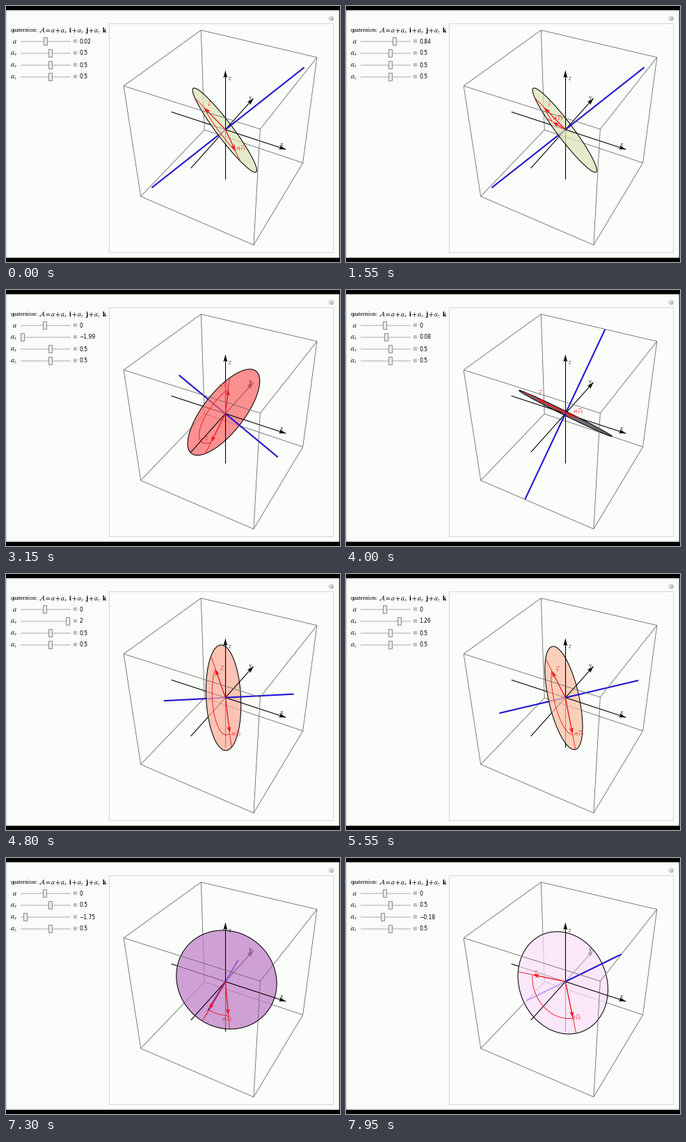
Animation of 480 by 368 pixels, one loop 8000 ms. Source, as a matplotlib script:

```python
import itertools
import numpy as np
import matplotlib.pyplot as plt
from matplotlib.animation import FuncAnimation
from matplotlib.patches import Circle, Polygon, Rectangle

W, H, DPI = 480, 368, 100
STEP, FRAMES = 50, 160
PX = 72 / DPI  # points per pixel

plt.rcParams["mathtext.fontset"] = "stix"

BLUE = (0.13, 0.08, 0.82)
RED = (0.93, 0.1, 0.13)
EDGE = (0.42, 0.42, 0.42)
RADIUS, ARROW = 0.79, 0.56
ALPHA = 0.72

# Turning points (ms, value) of each dragged slider
DRAG_A = [(-1013, -2), (1000, 2), (2000, 0)]
DRAG_X = [(2100, 0.5), (3200, -2), (4760, 2), (6350, 0.5)]
DRAG_Y = [(6250, 0.5), (6965, -2), (9055, 2)]

# Camera
EYE = np.array([1.3, -2.4, 2.0])
DIST = np.linalg.norm(EYE)
VIEW = EYE / DIST
RIGHT = np.cross([0, 0, 1], VIEW)
RIGHT /= np.linalg.norm(RIGHT)
UP = np.cross(VIEW, RIGHT)

# Colours added by light from the right, from above and from the viewer
AMBIENT = np.array([0.58, 0.71, 0.64])
LIGHTS = np.array([(0.37, 0.03, -0.05), (-0.03, 0.31, 0.25), (0.33, 0.04, 0.3)])
GLOSS = np.array([0.485, 0.23, 0.843])


def swing(t, turns):
    """Ease like a cosine from one turning point to the next."""
    value = turns[0][1]
    for (t0, v0), (t1, v1) in zip(turns, turns[1:]):
        if t > t0:
            u = min((t - t0) / (t1 - t0), 1)
            value = v0 + (v1 - v0) * (1 - np.cos(np.pi * u)) / 2
    return value


def project(p):
    p = np.asarray(p, float) / 2
    w = 1 - p @ VIEW / DIST
    return np.stack([315.3 + 186.5 * (p @ RIGHT) / w,
                     177.7 - 191 * (p @ UP) / w], axis=-1)


def unit(v):
    return v / np.linalg.norm(v)


def lit(n):
    """Colour of the disc whose visible side has normal n."""
    m = np.array([n @ RIGHT, n @ UP, n @ VIEW])
    shine = 0.08 * max(m @ GLOSS, 0) ** 12
    return np.clip(AMBIENT + m @ LIGHTS + shine, 0, 0.99)


fig = plt.figure(figsize=(W / DPI, H / DPI), dpi=DPI, facecolor="black")
ax = fig.add_axes([0, 0, 1, 1])
ax.set_xlim(0, W)
ax.set_ylim(H, 0)
ax.axis("off")


def rect(x, y, w, h, face, edge="none", lw=1, z=0):
    return ax.add_patch(Rectangle((x, y), w, h, fc=face, ec=edge,
                                  lw=lw * PX, zorder=z))


def line(points, color, lw, z):
    pts = np.asarray(points)
    return ax.plot(pts[:, 0], pts[:, 1], color=color, lw=lw * PX, zorder=z,
                   solid_capstyle="butt")[0]


def text(x, y, s, size, color="black", z=8, ha="left", font="Liberation Serif"):
    return ax.text(x, y, s, fontsize=size * PX, color=color, zorder=z, ha=ha,
                   va="center_baseline", family=font)


def head(color, z):
    return ax.add_patch(Polygon(np.zeros((4, 2)), fc=color, ec="none", zorder=z))


def head_shape(tail, tip, size=10, half=3):
    d = tip - tail
    length = np.hypot(*d)
    d = d / max(length, 1e-6)
    size = min(size, length)
    side = np.array([-d[1], d[0]]) * half
    base = tip - d * size
    return np.array([tip, base + side, base + d * size * 0.2, base - side])


def plus(x, y, r, color):
    line([(x - r, y), (x + r, y)], color, 0.8, 2)
    line([(x, y - r), (x, y + r)], color, 0.8, 2)


# Window and control panel
rect(-0.5, 5.5, 478, 355, (0.98, 0.99, 0.975), (0.8, 0.8, 0.8), 1.3)
rect(147.5, 24.5, 322.5, 329, (0.985, 0.993, 0.98), (0.83, 0.84, 0.83))
ax.add_patch(Circle((467.5, 18), 3, fc="0.93", ec="0.65", lw=0.8 * PX, zorder=1))
plus(467.5, 18, 1.8, "0.55")

text(7, 34, "quaternion:", 8.5)
text(47, 34, r"$\mathcal{A} = a + a_x\,\ \mathbf{i} + a_y\,\ \mathbf{j}"
             r" + a_z\,\ \mathbf{k}$", 9.6)

thumbs, values = [], []
for name, y in zip(("a", "a_x", "a_y", "a_z"), (50, 67, 84, 101)):
    text(12.5 if name == "a" else 11, y, f"${name}$", 10, ha="center")
    rect(20.5, y - 0.5, 71, 1.2, (0.88, 0.88, 0.88), (0.72, 0.72, 0.72), 0.5, 1)
    thumbs.append(rect(0, y - 5.5, 5, 11.5, (0.92, 0.92, 0.92),
                       (0.5, 0.5, 0.5), 0.9, 3))
    rect(96.5, y - 2, 4, 4, "0.9", "0.65", 0.8, 1)
    plus(98.5, y, 1.3, "0.6")
    values.append(text(105.5, y, "", 7.6, font="DejaVu Sans"))

# Box
far = (-1, 1, -1)
corners = list(itertools.product((-1, 1), repeat=3))
for p, q in itertools.combinations(corners, 2):
    if sum(i != j for i, j in zip(p, q)) == 1:
        line(project([p, q]), EDGE, 0.85, 1 if far in (p, q) else 6)

# Coordinate axes as half lines, so the disc can pass between them
halves = []
for d, (name, pos) in zip(np.eye(3), (("x", (396, 198)), ("y", (351.5, 131.5)),
                                      ("z", (322, 103.5)))):
    o, tip = project([(0, 0, 0), d])
    arrow = head("black", 2)
    arrow.set_xy(head_shape(o, tip))
    text(*pos, f"$\\mathbf{{\\mathit{{{name}}}}}$", 9.5, z=7, ha="center")
    halves.append((d, [line([o, tip], "black", 1.1, 2), arrow]))
    halves.append((-d, [line([o, project(-d)], "black", 1.1, 2)]))

disc = ax.add_patch(Polygon(np.zeros((3, 2)), fc="w", ec="none", zorder=3))
rim = line(np.zeros((2, 2)), "black", 1.05, 3.5)
rods = [line(np.zeros((2, 2)), BLUE, 2.1, 4) for _ in range(2)]
arc = line(np.zeros((2, 2)), RED, 0.9, 5)
spokes = [line(np.zeros((2, 2)), RED, 0.9, 5) for _ in range(2)]
shafts = [line(np.zeros((2, 2)), RED, 1.4, 5) for _ in range(2)]
heads = [head(RED, 5) for _ in range(2)]
tags = [text(0, 0, s, 9, RED, 7, "center")
        for s in (r"$\vec{v}$", r"$r(\vec{v})$")]


def place(artist, points):
    artist.set_data(points[:, 0], points[:, 1])


def show_sliders(numbers):
    for thumb, label, v in zip(thumbs, values, numbers):
        thumb.set_x(56 + 16.2 * v - 2.7)
        s = f"{v:.2f}".rstrip("0").rstrip(".")
        label.set_text("0" if s == "-0" else s.replace("-", "\u2212"))


def draw(i):
    t = i * STEP
    a, qx, qy = (swing(t, turns) for turns in (DRAG_A, DRAG_X, DRAG_Y))
    show_sliders((a, qx, qy, 0.5))

    n = unit(np.array([qx, qy, 0.5]))
    e1 = unit(np.array([-n[2], -n[2], n[0] + n[1]]))
    e2 = unit(np.array([n[2], -n[2], n[1] - n[0]]))
    span = np.arccos(np.clip(e1 @ e2, -1, 1))
    f = unit(e2 - (e1 @ e2) * e1)
    turn = span * np.arctan2(0.5, a) / (np.pi / 2)

    def ring(angles):
        return np.outer(np.cos(angles), e1) + np.outer(np.sin(angles), f)

    facing = np.sign(n @ VIEW)
    circle = project(RADIUS * ring(np.linspace(0, 2 * np.pi, 121)))
    shade = np.clip(1 - (1 - lit(facing * n)) / ALPHA, 0, 1)
    disc.set_xy(circle)
    disc.set_facecolor((*shade, ALPHA))
    place(rim, circle)

    for d, parts in halves:
        for part in parts:
            part.set_zorder(4 if facing * (n @ d) > 0 else 2)

    reach = min(1.5, 1 / np.abs(n).max())
    for rod, s in zip(rods, (1, -1)):
        place(rod, project([np.zeros(3), s * reach * n]))
        rod.set_zorder(4.5 if s * facing > 0 else 2.5)

    place(arc, project(ARROW * ring(np.linspace(0, turn, 50))))
    for k, d in enumerate(ring(np.array([0, turn]))):
        o, tip, end, tag = project([0 * d, ARROW * d, RADIUS * d,
                                    ARROW * d + 0.1 * n])
        shape = head_shape(o, tip, 9.5, 3)
        place(shafts[k], np.array([o, shape[2]]))
        place(spokes[k], np.array([tip, end]))
        heads[k].set_xy(shape)
        tags[k].set_position(tag)
    return []


anim = FuncAnimation(fig, draw, frames=FRAMES, interval=STEP, repeat=True,
                     repeat_delay=0, blit=False)
plt.show()
```
